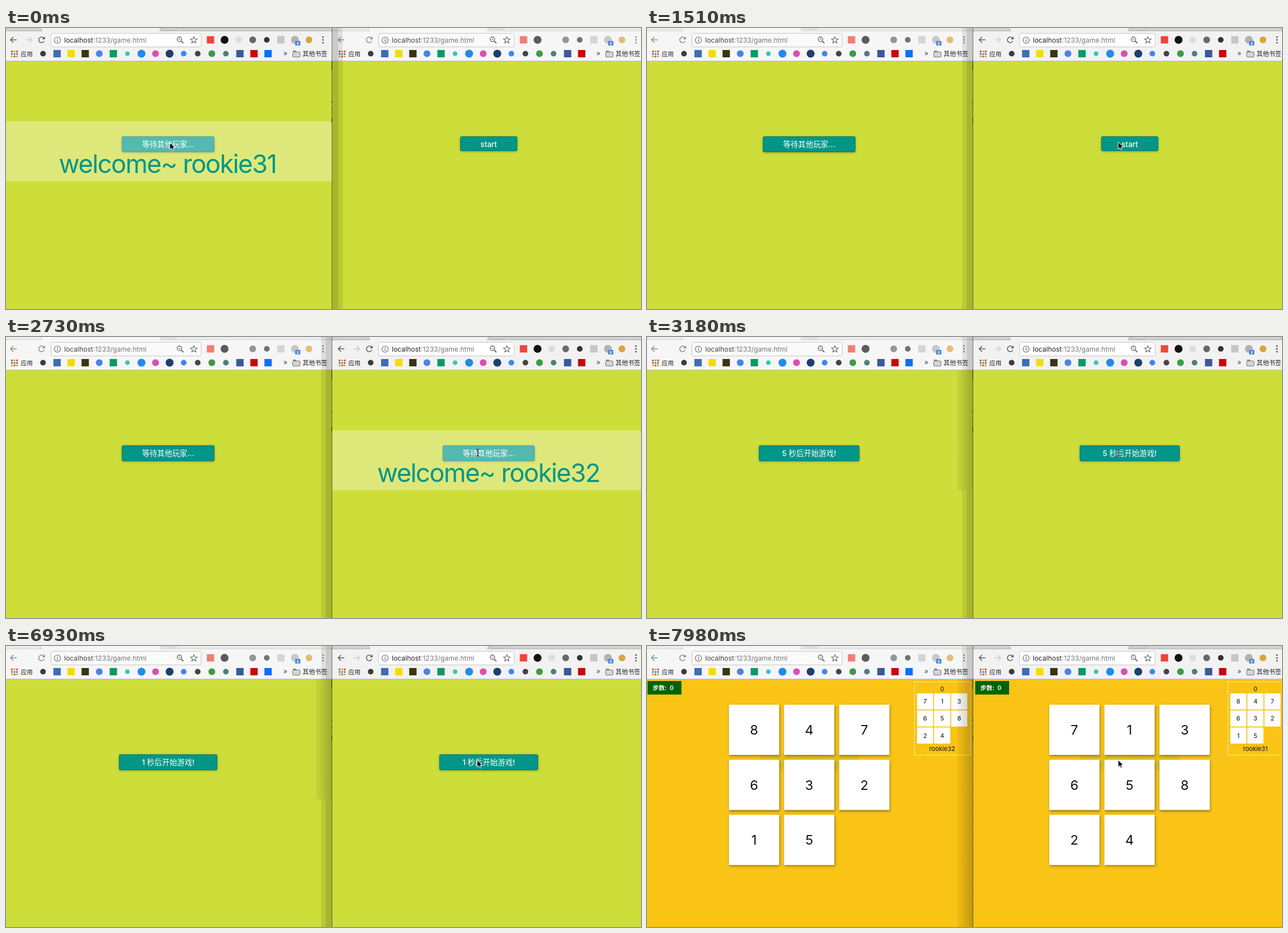
These frames come from a looping animation (1124x498 px, 8000 ms). An HTML page with a canvas:

```html
<!DOCTYPE html>
<html lang="zh">
<head>
<meta charset="utf-8">
<title>Sliding puzzle in two windows</title>
<style>
html, body { margin: 0; width: 100%; height: 100%; overflow: hidden; }
canvas { display: block; }
</style>
</head>
<body>
<canvas id="stage" width="1124" height="498"></canvas>
<script>
const g = document.getElementById('stage').getContext('2d');
const FONT = 'Inter, "Noto Sans CJK SC", "Noto Sans CJK", "Noto Sans", sans-serif';
const LOOP = 8000, TEAL = '#009688';
const LEFT_PLAYER = 'rookie31', RIGHT_PLAYER = 'rookie32';

// Latest entry [time, ...values] that has been reached
const at = (keys, t) => keys.filter(k => k[0] <= t).pop() || [];

const CURSOR = [[0, 290, 203], [150, 570, 191], [330, 739, 167], [480, 778, 177],
  [620, 803, 195], [920, 828, 200], [1070, 834, 202]];
const LEFT_BANNER = [[0, 271.7], [620, 113], [770, 0]];
const RIGHT_BANNER = [[0, 0], [1840, 223], [1980, 243.4], [2130, 271.7], [2880, 167], [3030, 65], [3180, 0]];
const COUNT = [[2880, 5], [3930, 4], [4830, 3], [5880, 2], [6930, 1]];
const GAME = [[0, 0], [7830, 0.3], [7980, 0.9]];

const BOOKMARKS = [['#3c3c3c', 5], ['#3f6db5'], ['#f2dc0c'], ['#3a3510'], ['#4b83e6', 6], ['#0a9a61'],
  ['#35c6b4', 4], ['#1f8ceb', 7], ['#d94fb0', 6], ['#1d3f6b', 7], ['#4285f4', 5], ['#444', 5],
  ['#3f9a43', 6], ['#4d7f7c', 5], ['#3b5998'], ['#c80808'], ['#0d6ff2']];
const EXTENSIONS = [['#f04438'], ['#111', 7], ['#ddd', 6], ['#646a6a', 6], ['#333', 5], ['#c6c6c6'],
  ['#b2b2b2', 7], ['#d9a43c', 6]];

function rect(x, y, w, h, color) {
  g.fillStyle = color;
  g.fillRect(x, y, w, h);
}
function box(x, y, w, h, r, fill, stroke) {
  g.beginPath();
  g.roundRect(x, y, w, h, r);
  if (fill) { g.fillStyle = fill; g.fill(); }
  if (stroke) { g.shadowColor = 'transparent'; g.strokeStyle = stroke; g.stroke(); }
}
function poly(points, fill, stroke, width = 1) {
  g.beginPath();
  points.forEach(([x, y]) => g.lineTo(x, y));
  if (fill) { g.closePath(); g.fillStyle = fill; g.fill(); }
  if (stroke) { g.strokeStyle = stroke; g.lineWidth = width; g.stroke(); g.lineWidth = 1; }
}
function ring(x, y, r, color, width = 1.3, from = 0, to = 7) {
  g.beginPath();
  g.arc(x, y, r, from, to);
  g.strokeStyle = color;
  g.lineWidth = width;
  g.stroke();
  g.lineWidth = 1;
}
function dot(x, y, r, color) {
  g.beginPath();
  g.arc(x, y, r, 0, 7);
  g.fillStyle = color;
  g.fill();
}
function text(s, x, y, size, color, align = 'left', weight = 400) {
  g.font = `${weight} ${size}px ${FONT}`;
  g.textAlign = align;
  g.fillStyle = color;
  g.fillText(s, x, y);
  return g.measureText(s).width;
}
function badge(x, y, [color, radius]) {
  if (radius) dot(x, y, radius, color);
  else rect(x - 6.5, y - 6.5, 13, 13, color);
}
function shadow(color, blur, dx, dy) {
  g.shadowColor = color;
  g.shadowBlur = blur;
  g.shadowOffsetX = dx;
  g.shadowOffsetY = dy;
}
function faded(alpha, draw) {
  g.save();
  g.globalAlpha = alpha;
  draw();
  g.restore();
}

// ox shifts what hangs on the left edge, rx what hangs on the right edge
function toolbar(ox, rx, active) {
  const ink = active ? '#5a5a5a' : '#8b8b8b';
  const strip = active ? '#d2d2d2' : '#ececec';
  const edge = active ? '#aaa' : '#d0d0d0';
  rect(ox - 3, 0, 580, 58, active ? '#f2f2f2' : '#f6f6f6');
  poly([[ox - 3, 0], [ox + 61, 0], [ox + 64, 5], [ox - 3, 5]], strip);
  poly([[ox - 3, 5], [ox + 64, 5], [ox + 61, 0]], null, edge);
  poly([[ox + 274, 0], [ox + 580, 0], [ox + 580, 5], [ox + 272, 5]], strip);
  poly([[ox + 274, 0], [ox + 272, 5], [ox + 580, 5]], null, edge);
  poly([[ox + 276, 0], [ox + 279, 3], [ox + 301, 3], [ox + 303, 0]], '#e6e6e6', edge);
  rect(ox - 3, 58, 580, 1, '#bdbdbd');

  poly([[ox + 13, 16], [ox + 8, 21], [ox + 13, 26]], null, ink, 1.5);
  poly([[ox + 8, 21], [ox + 19, 21]], null, ink, 1.5);
  if (active) {
    poly([[ox + 41, 16], [ox + 46, 21], [ox + 41, 26]], null, '#ccc', 1.5);
    poly([[ox + 35, 21], [ox + 46, 21]], null, '#ccc', 1.5);
  }
  ring(ox + 63, 21, 5, ink, 1.5, 0.4, 5.5);
  poly([[ox + 69, 15], [ox + 69, 20], [ox + 64, 20]], ink);

  box(ox + 79.5, 9.5, rx + 266 - ox, 24, 3, active ? '#fff' : '#fafafa', '#c6c6c6');
  ring(ox + 91, 21.5, 5.5, '#666', 1.1);
  rect(ox + 90.5, 20.5, 1.3, 4, '#666');
  rect(ox + 90.5, 18, 1.3, 1.4, '#666');
  const host = text('localhost', ox + 103, 26, 12, active ? '#222' : '#444');
  text(':1233/game.html', ox + 103 + host, 26, 12, '#777');
  ring(rx + 307, 20, 4, '#666');
  poly([[rx + 310, 23], [rx + 314, 27]], null, '#666', 1.8);
  rect(rx + 305, 19.5, 4, 1, '#666');
  const star = Array.from({ length: 11 }, (_, i) => {
    const a = i * Math.PI / 5 - Math.PI / 2, r = i % 2 ? 2.7 : 6.2;
    return [rx + 332.5 + r * Math.cos(a), 21.5 + r * Math.sin(a)];
  });
  poly(star, null, '#666', 1.1);

  EXTENSIONS.forEach((icon, i) => {
    if (!active && i === 2) return;
    faded(active ? 1 : 0.68, () => badge(rx + 362 + i * 24.9, 21, icon));
  });
  rect(rx + 512, 23, 9, 8, '#4285d8');
  text('x', rx + 516.5, 30, 8, '#fff', 'center', 600);
  for (let i = -1; i < 2; i++) dot(rx + 561, 21 + i * 5, 1.5, ink);

  for (let i = 0; i < 9; i++)
    rect(ox + 9 + i % 3 * 4.5, 40 + (i / 3 | 0) * 4.5, 3, 3, ['#e54b3c', '#3d9b54', '#e2a72e', '#4679d0'][(i * 2 + (i / 3 | 0)) % 4]);
  text('应用', ox + 26, 50, 10.7, '#222');
  BOOKMARKS.slice(0, ox ? 16 : 17).forEach((icon, i) => badge(ox + 65.5 + i * 24.9, 45.5, icon));
  text('»', rx + 491, 49, 12, '#444');
  box(rx + 507.5, 42.5, 13, 9, 1.5, '#d4d4d4', '#777');
  poly([[rx + 508, 42], [rx + 508, 40], [rx + 513, 40], [rx + 514, 42]], '#888');
  text('其他书签', rx + 525, 50, 10.9, '#222');
}

function button(x, right, height, label) {
  g.save();
  shadow('rgba(0,0,0,.4)', 4, 0, 1);
  box(x + 0.5, 192.5, right - x - 1, height - 1, 2, TEAL, '#08796a');
  g.restore();
  text(label, (x + right) / 2, label === 'start' ? 210.5 : 211, 13.33, '#fff', 'center', 500);
}

function banner(x, w, bottom, name) {
  if (!bottom) return;
  g.save();
  g.beginPath();
  g.rect(x, 59, w, 439);
  g.clip();
  rect(x, bottom - 106.4, w, 106.4, 'rgba(255,255,255,.33)');
  g.letterSpacing = '-1.6px';
  text('welcome~ ' + name, x ? 854 : 286, bottom - 15, 45, TEAL, 'center');
  g.restore();
}

function tile(x, y, size, digit, fontSize, soft) {
  g.save();
  if (soft) shadow('rgba(0,0,0,.4)', 4, 1, 2);
  rect(x, y, size, size, '#fff');
  g.restore();
  text(digit, x + size / 2, y + size / 2 + fontSize * 0.36, fontSize, '#111', 'center');
}

function board(ox, mx, own, other, rival) {
  rect(ox + 1, 62, 60, 24, '#006400');
  text('步数:  0', ox + 10, 78, 10.7, '#fff', 'left', 600);
  const place = (digits, draw) => [...digits].forEach((d, i) => draw(d, i % 3, i / 3 | 0));
  place(own, (d, c, r) => tile((ox ? 712 : 145) + c * 97.6, 104 + r * 97.6, 89, d, 23.5, true));
  g.setLineDash([3, 2]);
  g.strokeStyle = '#fff';
  g.strokeRect(mx + 473.5, 63.5, 99, 130);
  g.setLineDash([]);
  text('0', mx + 522.5, 80, 11, '#111', 'center');
  place(other, (d, c, r) => tile(mx + 478 + c * 30.2, 84 + r * 30.2, 28.5, d, 11, false));
  text(rival, mx + 522.5, 186, 11, '#111', 'center');
}

// Shadow the focused window casts on its neighbour; side is 1 to the right, -1 to the left
function windowShadow(side, softFrom, softTo) {
  const strip = (near, far, y, h, fill) =>
    rect(side > 0 ? 577 + near : 577 - far, y, far - near, h, fill);
  const bands = (y, h) => {
    strip(0, 11, y, h, 'rgba(0,0,0,.18)');
    strip(11, 19, y, h, 'rgba(0,0,0,.09)');
  };
  bands(0, softFrom);
  if (softTo > softFrom) {
    const blend = g.createLinearGradient(577, 0, 577 + side * 28, 0);
    blend.addColorStop(0, 'rgba(0,0,0,.23)');
    blend.addColorStop(1, 'rgba(0,0,0,.03)');
    strip(0, 28, softFrom, softTo - softFrom, blend);
  }
  bands(softTo, 498 - softTo);
}

function pointer(t) {
  const [, x, y] = at(CURSOR, t);
  if (t >= 2730 && t < 3780) {
    const beam = [[-3, -6], [0, -4], [3, -6], [0, -4], [0, 6], [-3, 8], [0, 6], [3, 8]];
    const shape = beam.map(([a, b]) => [x + 1 + a, y + 2 + b]);
    poly(shape, null, 'rgba(255,255,255,.6)', 2.5);
    poly(shape, null, '#111', 1.2);
    return;
  }
  const arrow = [[0, 0], [0, 12.5], [3, 10], [5, 14.5], [7, 13.5], [5.2, 9.2], [9, 9]];
  poly([...arrow, [0, 0]].map(([a, b]) => [x + a, y + b]), '#000', '#fff', 1);
}

function render(t) {
  const mix = at(GAME, t)[1], count = at(COUNT, t)[1];
  const rightFocus = t >= 1510, shadowOnLeft = t >= 1360;
  const blend = (a, b) => a + (b - a) * mix;
  rect(0, 0, 1124, 498, `rgb(${blend(205, 254)},${blend(221, 193)},${blend(57, 17)})`);

  faded(mix ? (1 - mix) * 0.7 : 1, () => {
    if (count) {
      const label = count + ' 秒后开始游戏!';
      const last = count === 1;
      button(last ? 200 : count === 2 ? 199 : 198, last ? 374 : 376, 28, label);
      button(last ? 767 : 766, last ? 942 : 943, 28, label);
    } else {
      button(205, 369, 28, '等待其他玩家...');
      if (t < 1840) button(804, 905, 26, 'start');
      else button(773, 936, 28, '等待其他玩家...');
    }
  });
  banner(0, 577, at(LEFT_BANNER, t)[1], LEFT_PLAYER);
  banner(577, 547, at(RIGHT_BANNER, t)[1], RIGHT_PLAYER);

  if (mix) faded(Math.min(1, mix * 1.12), () => {
    board(0, 0, '84763215', '71365824', RIGHT_PLAYER);
    board(580, 554.5, '71365824', '84763215', LEFT_PLAYER);
  });

  toolbar(0, 0, !rightFocus);
  g.save();
  g.beginPath();
  g.rect(577, 0, 547, 59);
  g.clip();
  toolbar(580, 554, rightFocus);
  g.restore();

  const soft = shadowOnLeft ? t >= 2880 : t >= 620;
  windowShadow(shadowOnLeft ? -1 : 1, 59, mix ? 498 : soft ? 272 : 59);
  rect(576.5, 0, 1, 498, 'rgba(60,65,35,.75)');
  for (const [y, h] of [[60, 15], [130, 3], [142, 2], [159, 9]]) rect(576, y, 1, h, 'rgba(0,0,0,.55)');
  pointer(t);
}

function frame(now) {
  render(now % LOOP);
  requestAnimationFrame(frame);
}
requestAnimationFrame(frame);
</script>
</body>
</html>
```
